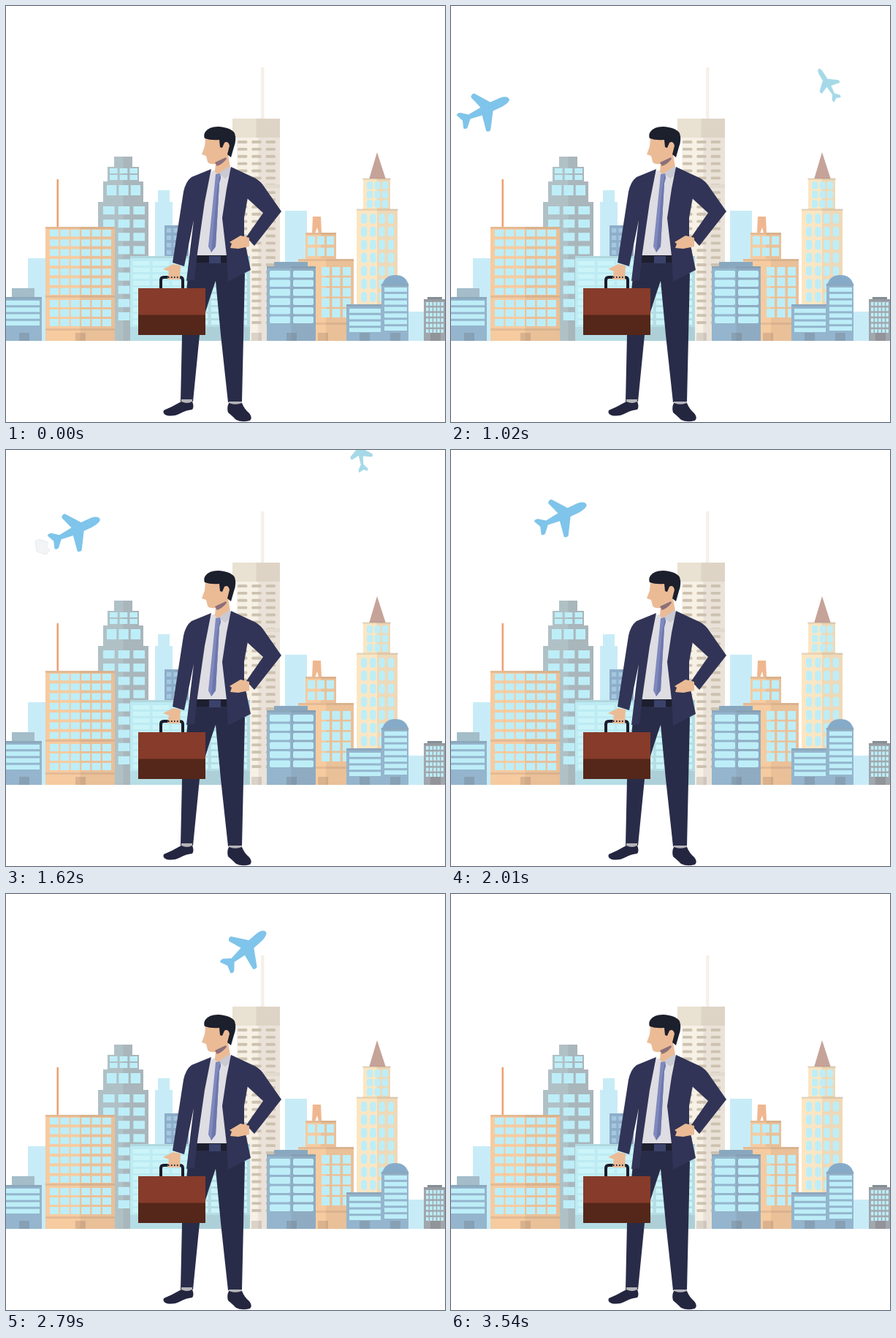
Recreate the animation shown at these times as an HTML page. Size 601 by 569 pixels, loop 3.6 s.

```html
<!DOCTYPE html>
<html lang="en">
<head>
<meta charset="utf-8">
<title>Businessman and skyline</title>
<style>
  html, body { margin: 0; width: 100%; height: 100%; overflow: hidden; background: #fff; }
  svg { display: block; width: 601px; height: 569px; }
  .navy { fill: #313456; }
  .skin { fill: #ebbb96; }
  .hair { fill: #1c1f2c; }
  .shoe { fill: #242640; }
</style>
</head>
<body>
<svg viewBox="0 0 601 569">
  <g id="city"></g>

  <g id="man">
    <path fill="#292c48" d="M258 349H306L327 366L323 542H304L294 450L287 376Q270 425 265 450L256 541H239L241 450L249 370Z"/>
    <path fill="#b5b4b8" d="M240 538H255V543H240ZM305 541H323V544H305Z"/>
    <path class="shoe" d="M240 541Q248 545 255 541Q258 548 255 552Q246 553 239 557Q230 562 220 560Q214 558 216 553Q228 548 240 541Z"/>
    <path class="shoe" d="M305 543Q314 546 323 543Q326 551 333 557Q338 563 334 567Q323 570 315 566Q309 560 304 556Q302 549 305 543Z"/>

    <path fill="#dedde3" d="M281 226L306 219L312 232L303 343H261L266 290Z"/>
    <path fill="#1d1f2f" d="M260 341H303V351H260Z"/>
    <path fill="#3a426b" d="M278 342H294V352H278Z"/>
    <path class="skin" d="M287 213L304 203L307 220L291 231L286 227Z"/>
    <path fill="#c9cad2" d="M306 219L311 227L300 236L291 229Z"/>
    <path fill="#7f89bd" d="M287 230L293 229L294 235L292 242L287 329L281 337L277 329L286 241Z"/>
    <path fill="#6d77ac" d="M293 230L294 235L292 242L287 329L281 337L289 250Z"/>

    <path class="navy" d="M281 223L254 234Q246 240 243 254L228 351L244 356L257 293L247 376L258 375L262 338L272 268Z"/>
    <path class="navy" d="M308 220L342 236L331 262L326 290V318L335 361L304 377L302 342L296 290L302 250Z"/>
    <path class="navy" d="M325 229L342 236Q349 240 354 248L377 281L340 328L329 316L352 283L329 262Z"/>

    <path class="skin" d="M333 317L321 314L306 323L309 325L307 331L318 332L333 329Z"/>
    <path class="skin" d="M273 181L272 192L268 203L274 205L276 213Q278 217 287 216L301 208L309 197L307 182L294 176Z"/>
    <path fill="#8b7079" d="M286 214L301 207L302 209Q297 216 289 219Z"/>
    <path class="hair" d="M272 181Q270 176 273 172Q278 165 290 165Q308 166 313 174Q316 183 312 193L308 207L303 203L306 191Q304 184 299 187L296 194L293 193L292 183Q280 184 272 181Z"/>

    <path fill="none" stroke="#1b1d2b" stroke-width="4" d="M212 387V375Q212 371 216 371H238Q242 371 242 375V387"/>
    <path class="skin" d="M229 353L239 355L238 374H221L223 363L215 360Z"/>
    <path fill="none" stroke="#1b1d2b" stroke-width="2" stroke-dasharray="1.500 2.500" d="M222 371H238"/>
    <path fill="#873b2a" d="M181 386H273V423H181Z"/>
    <path fill="#54271a" d="M181 422.500H273V450H181Z"/>
  </g>

  <path id="puff" fill="#f2f4f6" stroke="#e4e7ea" stroke-width=".8" d="M-10 -8L-5 -11L7 -7L6 0L10 4L5 10L-8 6Z"/>
  <path id="big" fill="#7fc4ea"/>
  <path id="small" fill="#a6d9e8"/>
</svg>

<script>
const $ = id => document.getElementById(id);
const BASE = 458, GLASS = '#bdeef8';
const ORANGE = '#f6cba0', BLUE = '#94b5cd', GRAY = '#b0c1c6', CREAM = '#fbe6c3', BEIGE = '#f6f0e5', TEAL = '#bdebf3';

const box = (x1, y1, x2, y2, fill, rx = 0) =>
  `<rect x="${x1}" y="${y1}" width="${x2 - x1}" height="${y2 - y1}" rx="${rx}" fill="${fill}"/>`;
const shape = (d, fill) => `<path d="${d}" fill="${fill}"/>`;
const shade = (x1, y1, x2, y2, alpha) => box(x1, y1, x2, y2, `rgba(70,50,50,${alpha})`);

// A wall with its right half in shadow
const wall = (x1, y1, x2, fill, y2 = BASE) =>
  box(x1, y1, x2, y2, fill) + shade((x1 + x2) / 2, y1, x2, y2, .07);
const trim = (x1, y, x2) => shade(x1, y, x2, y + 3, .1);
const door = x => shade(x, 447, x + 14, BASE, .16);

// Equal panes filling an area
function panes(x1, y1, x2, y2, cols, rows, gapX = 3, gapY = 4, fill = GLASS, rx = 0) {
  const dx = (x2 - x1 + gapX) / cols, dy = (y2 - y1 + gapY) / rows;
  let out = '';
  for (let i = 0; i < cols * rows; i++) {
    const x = x1 + i % cols * dx, y = y1 + Math.floor(i / cols) * dy;
    out += box(x, y, x + dx - gapX, y + dy - gapY, fill, rx);
  }
  return out;
}

// Storeys widening downwards, each with its own row of panes
const steppedTower = () => {
  let out = wall(148, 206, 173, GRAY) + wall(139, 220, 182, GRAY);
  out += wall(133, 240, 188, GRAY) + wall(126, 268, 195, GRAY);
  return out + panes(142, 222, 180, 238, 3, 2, 3, 2) + panes(138, 245, 184, 259, 3, 1) +
    panes(133, 274, 190, 430, 3, 9, 5, 7);
};

$('city').innerHTML = [
  ...[[30, 345, 60], [204, 268, 228], [208, 252, 224], [382, 280, 412], [551, 418, 573]]
    .map(([x1, y, x2]) => box(x1, y, x2, BASE, '#c8ecf7')),

  box(349, 84, 353.5, 154, '#f7efe9'),
  wall(316, 180, 375, BEIGE), wall(310, 154, 375, '#e9e1d2', 180),
  panes(317, 184, 369, 435, 3, 26, 6, 6, '#cdc2b0', 1.5),
  box(316, 244, 375, 249, '#e2dacd'), door(336),

  steppedTower(),

  box(69.5, 237, 72, 303, '#ee9f72'),
  wall(54, 302, 149, ORANGE), trim(54, 302, 149), trim(54, 396, 149), trim(54, 441, 149),
  panes(60, 306, 144, 395, 6, 7, 2.3), panes(60, 402, 144, 438, 6, 3, 2.3, 3), door(95),

  box(8, 386, 39, 398, '#a3bdc9'), box(0, 398, 49, BASE, BLUE), trim(0, 398, 49),
  panes(0, 403, 46, 437, 1, 4, 0, 3), door(18),

  wall(217, 300, 250, '#8eaecb'), panes(220, 304, 245, 340, 3, 4, 3, 4, '#a4c8df'),
  wall(170, 342, 334, TEAL), trim(170, 342, 334),
  panes(174, 349, 330, 436, 6, 10, 4, 3, '#cbf4f9'), shade(170, 439, 334, BASE, .07),

  shape('M420 288H431L432 311H428L426 303L423 311H419Z', '#efb78f'),
  wall(410, 310, 452, ORANGE), trim(410, 310, 452), panes(413, 315, 449, 342, 3, 2),
  wall(400, 346, 476, ORANGE), trim(400, 346, 476), trim(400, 433, 476),
  panes(432, 357, 472, 426, 3, 5, 3.5, 2.5), door(427),

  box(367, 350, 413, 358, '#89a8bf'), wall(357, 356, 424, BLUE), trim(357, 356, 424),
  panes(361, 362, 421, 434, 2, 6, 4, 3, GLASS, 2), door(384),

  shape('M508 200L520 237H497Z', '#c6a399'),
  wall(489, 236, 526, CREAM), trim(488, 235, 527), panes(494, 240, 523, 276, 3, 3, 2.5, 2, GLASS, 3),
  wall(480, 278, 536, CREAM), trim(480, 277, 537), panes(486, 284, 531, 405, 4, 7, 4, 4, GLASS, 4),

  box(466, 408, 516, BASE, BLUE), trim(466, 408, 516), panes(470, 414, 513, 446, 1, 4, 0, 3),
  shape('M515 381Q519 368 533 368Q547 368 551 381Z', '#86abc9'),
  box(514, 380, 551, BASE, BLUE), trim(513, 380, 552), panes(518, 385, 549, 444, 1, 7, 0, 3),
  door(484), door(526),

  box(577, 398, 597, 402, '#858d95'), box(572, 401, 601, BASE, '#a0a7ad'), trim(572, 401, 601),
  panes(575, 405, 599, 447, 5, 6, 1.5, 2.5), door(581)
].join('');

const PLANE = 'M34.5 0C34.5 3 27 5.5 20 6L8 6.5L-5 29.5Q-8 31.5 -11 28.5L-8 6.5L-25 5L-33 14.5Q-36 16 -38.5 13.5' +
  'L-35.5 3L-40.5 -7Q-38 -9.5 -34 -8L-25 -1.5L-6 -4.5L-13 -22Q-11.5 -26 -7 -25.5L9 -6L24 -6.5C31 -6 34.5 -3.5 34.5 0Z';
$('big').setAttribute('d', PLANE);
$('small').setAttribute('d', PLANE);

// Flights are cubic curves through x, y and heading over 1710 ms each
const bezier = (u, a, b, c, d) =>
  (1 - u) ** 3 * a + 3 * u * (1 - u) ** 2 * b + 3 * u * u * (1 - u) * c + u ** 3 * d;
const climb = u => [-26 + 140 * u, 201 - 128 * u + 25 * u * u, -21 - 2 * u];
const soar = u => [bezier(u, 114, 236, 400, 436), bezier(u, 98, 55, 141, -62), bezier(u, -23, -20, -46, -62)];
const cross = u => [bezier(u, 619, 552, 462, 490), bezier(u, 211, 159, 84, -40), bezier(u, -140, -134, -110, -88)];

const LOOP = 3600, STEP = 30, TAKEOFF = 120, LEG = 1710, start = performance.now();

function place(el, pose, scale) {
  el.style.display = pose ? '' : 'none';
  if (!pose) return;
  const [x, y, angle] = pose;
  el.setAttribute('transform', `translate(${x} ${y}) rotate(${angle}) scale(${scale})`);
}

function render(now) {
  const t = Math.floor((Math.max(0, now - start) % LOOP) / STEP) * STEP;
  const u = (t - TAKEOFF) / LEG;
  place($('big'), u >= 0 && u < 2 && (u < 1 ? climb(u) : soar(u - 1)), '1');
  place($('small'), u >= 0 && u < 1 && cross(u), '.67 .55');

  const age = (t - 1500) / 360;
  $('puff').style.opacity = age > 0 && age < 1 ? Math.min(1, age * 4, (1 - age) * 2.5) : 0;
  place($('puff'), [52 - age * 6, 133, 0], 0.83 + Math.max(0, age) * 0.5);
  requestAnimationFrame(render);
}
render(start);
</script>
</body>
</html>
```
